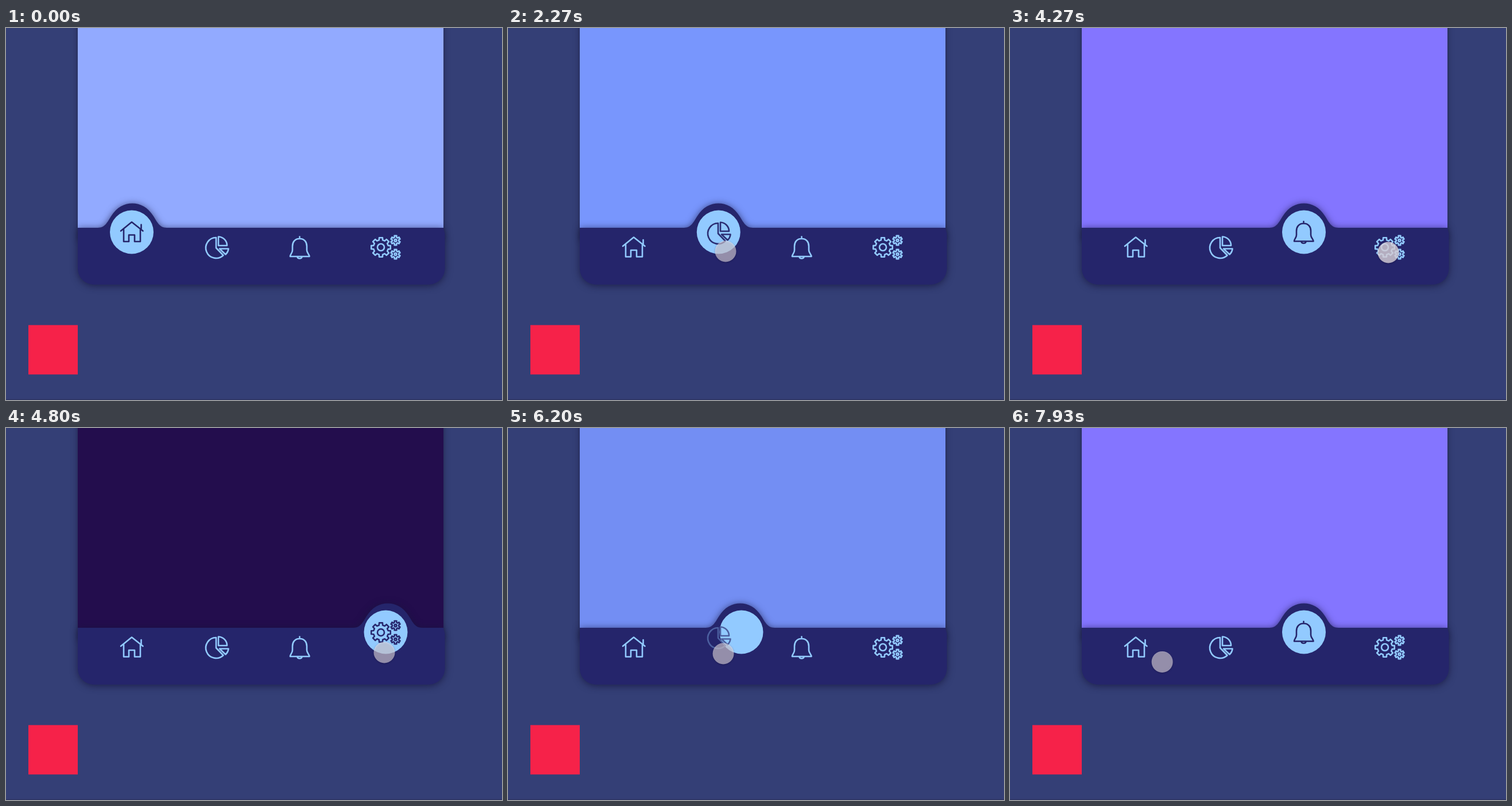
An HTML page with a canvas for the animation above (8000 ms loop, 864x648 px).

```html
<!DOCTYPE html>
<html lang="en">
<head>
<meta charset="utf-8">
<title>Tab bar</title>
<style>
  html, body { margin: 0; width: 100%; height: 100%; overflow: hidden; background: #343f76; }
  canvas { display: block; width: 864px; height: 648px; }
</style>
</head>
<body>
<canvas id="stage" width="864" height="648"></canvas>
<script>
const ctx = document.getElementById('stage').getContext('2d');
const LOOP = 8000;
const LIGHT = [146, 202, 255], NAVY = [37, 37, 107];

// Outline of a cog whose first tooth points up.
function cog(cx, cy, inner, outer, teeth, hole) {
  const path = new Path2D();
  const step = Math.PI * 2 / teeth;
  for (let i = 0; i < teeth; i++) {
    const mid = i * step - Math.PI / 2;
    for (const [turn, radius] of [[-.31, inner], [-.22, outer], [.22, outer], [.31, inner]]) {
      const a = mid + turn * step;
      path.lineTo(cx + radius * Math.cos(a), cy + radius * Math.sin(a));
    }
  }
  path.closePath();
  path.moveTo(cx + hole, cy);
  path.arc(cx, cy, hole, 0, Math.PI * 2);
  return path;
}

const gears = cog(653, 382, 13, 17, 8, 6);
gears.addPath(cog(678.5, 370, 5.8, 8.3, 6, 2));
gears.addPath(cog(678.5, 394, 5.8, 8.3, 6, 2));

const tabs = [
  { x: 219, hump: 220, screen: [146, 170, 255], icon: new Path2D(
    'M200 380 L219 364.5 L238.5 380 M235.5 369 V377 M205 377 V398.5 H214 V387 H224 V398.5 H234 V377') },
  { x: 367, hump: 364.5, screen: [120, 150, 253], icon: new Path2D(
    'M366 365 A18 18 0 1 0 378.5 396 L366 383 Z M370 363.5 A15.5 15.5 0 0 1 385 379 H370 Z M372 384.5 H387.5 A16 16 0 0 1 382.5 394.5 Z') },
  { x: 512, hump: 512, screen: [132, 117, 255], icon: new Path2D(
    'M511.5 367 C503 367 499 373 499 380 V387 C499 392 495 394 495 398 H528.5 C528.5 394 524 392 524 387 V380 C524 373 520 367 511.5 367 Z ' +
    'M507.5 399 A4.2 3.5 0 0 0 515.5 399 M511.5 363.5 V365') },
  { x: 661.5, hump: 662.5, screen: [35, 13, 77], icon: gears }
];

// [time, tab]
const clicks = [[1900, 1], [3250, 2], [4400, 3], [5930, 1], [7150, 2]];

// [time, x, y]
const pointer = [
  [300, 890, 440], [1500, 379, 389], [2500, 379, 389], [3100, 524, 392],
  [3500, 524, 392], [4150, 659, 391], [4900, 659, 391], [5700, 375, 393],
  [6350, 375, 393], [7000, 520, 392], [7500, 520, 392], [8144, 222, 410]
];

const clamp = v => Math.min(1, Math.max(0, v));
const lerp = (a, b, p) => a + (b - a) * p;
const mix = (a, b, p) => `rgb(${a.map((v, i) => Math.round(lerp(v, b[i], p)))})`;
const easeInOut = v => {
  v = clamp(v);
  return v < .5 ? 4 * v ** 3 : 1 - 4 * (1 - v) ** 3;
};

function withShadow(color, blur, y, draw) {
  ctx.save();
  ctx.shadowColor = color;
  ctx.shadowBlur = blur;
  ctx.shadowOffsetY = y;
  draw();
  ctx.restore();
}

function disc(x, y, r) {
  ctx.beginPath();
  ctx.arc(x, y, r, 0, Math.PI * 2);
  ctx.fill();
}

function barPath(c) {
  const [left, right, top, bottom, r] = [125, 764.5, 348, 447, 28];
  return new Path2D(`M${left} ${top} H${c - 60}
    C${c - 47} ${top} ${c - 43} 337 ${c - 37} 328 C${c - 27} 312 ${c - 14} 305.5 ${c} 305.5
    C${c + 14} 305.5 ${c + 27} 312 ${c + 37} 328 C${c + 43} 337 ${c + 47} ${top} ${c + 60} ${top}
    H762 L${right} 358 V${bottom - r} a${r} ${r} 0 0 1 ${-r} ${r}
    H${left + r} a${r} ${r} 0 0 1 ${-r} ${-r} Z`);
}

function drawPointer(t) {
  if (t < pointer[0][0]) return;
  const i = pointer.findIndex(key => key[0] > t);
  const [t0, x0, y0] = pointer[i - 1], [t1, x1, y1] = pointer[i];
  const p = easeInOut((t - t0) / (t1 - t0));
  const press = Math.max(...clicks.map(([at]) => clamp(1.5 - Math.abs(t - at + 50) / 100)));
  const x = lerp(x0, x1, p), y = lerp(y0, y1, p);
  ctx.fillStyle = `rgba(247, 238, 241, ${lerp(.54, .76, press)})`;
  withShadow('rgba(15, 12, 45, .6)', 3, 1, () => disc(x, y, 18.5));
}

function draw(t) {
  let current = 0, previous = 0, since = 1e5;
  for (const [at, tab] of clicks) {
    if (t >= at) [previous, current, since] = [current, tab, t - at];
  }
  const from = tabs[previous], to = tabs[current];
  const slide = easeInOut(since / 400);
  const tint = 1 - (1 - clamp(since / 400)) ** 2.5;
  const sway = Math.sign(to.x - from.x) * 2.5 * Math.sin(Math.PI * clamp((since - 300) / 200));

  ctx.fillStyle = '#343f76';
  ctx.fillRect(0, 0, 864, 648);
  ctx.fillStyle = '#2c3462';
  ctx.fillRect(0, 646.5, 864, 1.5);

  ctx.fillStyle = mix(from.screen, to.screen, tint);
  withShadow('rgba(22, 22, 55, .65)', 9, 0, () => ctx.fillRect(125, -30, 637, 400));

  ctx.fillStyle = mix(NAVY, NAVY, 0);
  const bar = barPath(lerp(from.hump, to.hump, slide) + sway);
  withShadow('rgba(22, 22, 60, .75)', 13, 2, () => ctx.fill(bar));

  ctx.fillStyle = mix(LIGHT, LIGHT, 0);
  disc(lerp(from.x, to.x, slide), 355.5, 38);

  ctx.lineWidth = 2.6;
  ctx.lineCap = ctx.lineJoin = 'round';
  tabs.forEach((tab, i) => {
    const active = i === current ? easeInOut(since / 490)
      : i === previous ? 1 - easeInOut(since / 250) : 0;
    ctx.save();
    ctx.translate(0, -26.5 * active);
    ctx.strokeStyle = mix(LIGHT, NAVY, active);
    ctx.stroke(tab.icon);
    ctx.restore();
  });

  ctx.fillStyle = '#f62249';
  ctx.fillRect(39, 517.5, 86, 86);

  drawPointer(t);
}

const start = performance.now();
function tick() {
  draw((performance.now() - start) % LOOP);
  requestAnimationFrame(tick);
}
tick();
</script>
</body>
</html>
```
